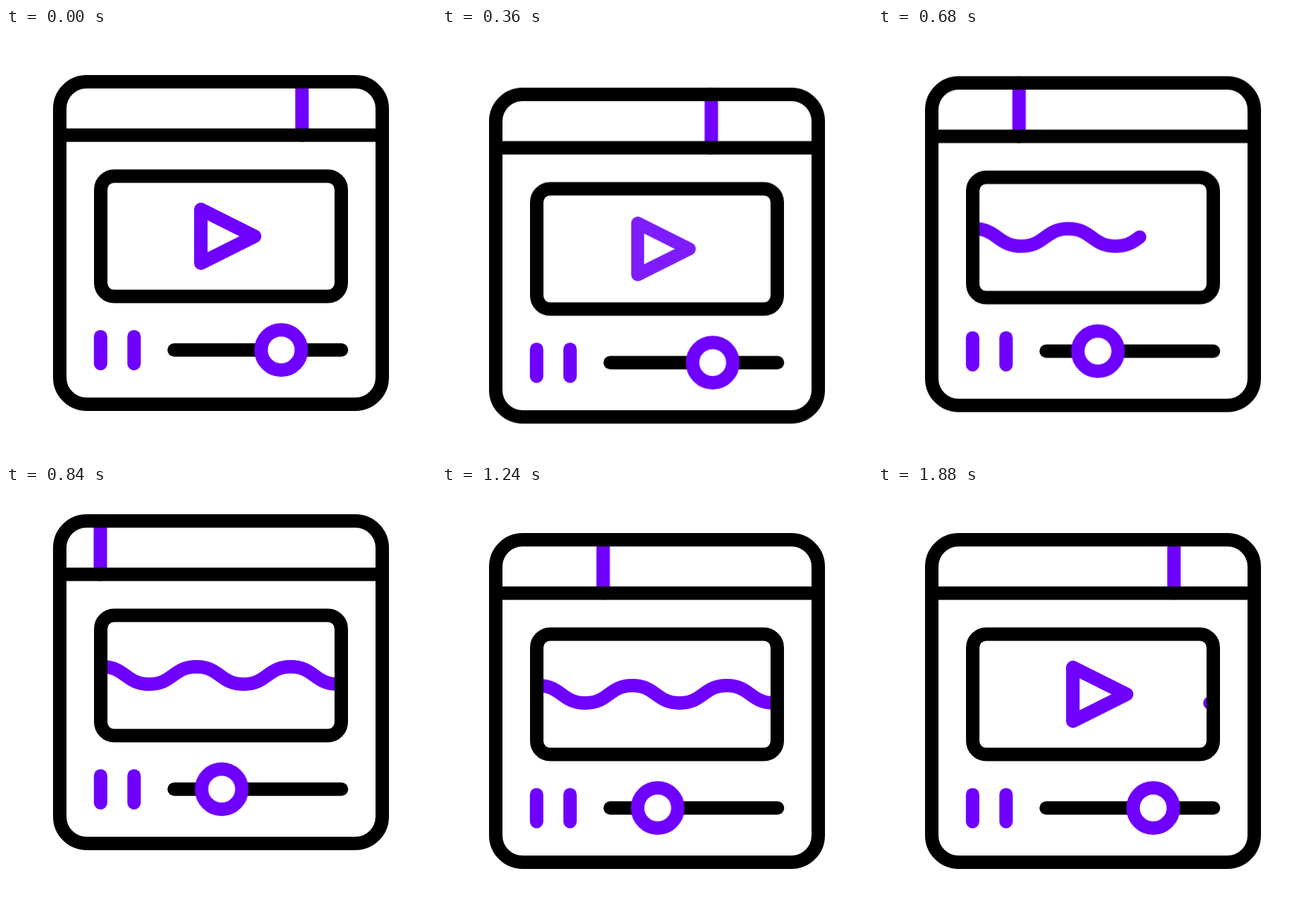
Recreate the animation shown at these times as an HTML page. Size 640x640 px, loop 2000 ms.

```html
<!DOCTYPE html>
<html lang="en">
<head>
<meta charset="utf-8">
<title>Media player icon</title>
<style>
  html, body { margin: 0; width: 100%; height: 100%; overflow: hidden; background: #fff; }
  svg { display: block; width: 100%; height: 100%; }
  g, path, rect, circle {
    fill: none;
    stroke-width: 20;
    stroke-linecap: round;
    stroke-linejoin: round;
  }
  .ink { stroke: #000; }
  .accent { stroke: #6f00ff; }

  .body, .tab, .knob, .wave, .play, .pause {
    animation: 2s cubic-bezier(.3333, 0, .6667, 1) infinite;
  }
  .body { animation-name: bob; }
  .tab { animation-name: slide; }
  .knob { animation-name: seek; fill: #fff; }
  .wave { animation-name: draw; stroke-dasharray: 1 2; }
  .play { animation-name: shrink, fade; transform-origin: 320px 310px; }
  .pause { animation-name: squeeze; }

  @keyframes bob {
    0%, 8% { transform: translateY(0); }
    26% { transform: translateY(32px); }
    42% { transform: translateY(-28px); }
    62%, 100% { transform: translateY(0); }
  }
  @keyframes slide {
    0%, 10% { transform: translateX(0); }
    46% { transform: translateX(-310.5px); }
    86%, 100% { transform: translateX(0); }
  }
  @keyframes seek {
    0%, 14% { transform: translateX(0); }
    38%, 62% { transform: translateX(-88.6px); }
    80%, 100% { transform: translateX(0); }
  }
  /* the line grows from the left, then leaves to the right */
  @keyframes draw {
    0%, 20% { stroke-dashoffset: 1; }
    42%, 62% { stroke-dashoffset: 0; }
    94%, 100% { stroke-dashoffset: -1; }
  }
  @keyframes shrink {
    0%, 4% { transform: scale(1); }
    24%, 84% { transform: scale(.95); }
    94%, 100% { transform: scale(1); }
  }
  @keyframes fade {
    0%, 16% { opacity: 1; }
    26%, 84% { opacity: 0; }
    94%, 100% { opacity: 1; }
  }
  /* bars shorten towards their middle */
  @keyframes squeeze {
    0%, 62% { stroke-dasharray: 40 80; stroke-dashoffset: 0; }
    71% { stroke-dasharray: 16 80; stroke-dashoffset: -12; }
    80%, 100% { stroke-dasharray: 40 80; stroke-dashoffset: 0; }
  }
</style>
</head>
<body>
<svg viewBox="0 0 640 640">
  <g class="body">
    <path class="accent tab" d="M440.5 80V159.5"/>
    <path class="accent wave" pathLength="1"
      d="M143 297c35 0 35 26 70.2 26s35-26 70.2-26 35 26 70.2 26 35-26 70.2-26 35 26 70.2 26"/>
    <path class="accent play" d="M290 270V350L370 310Z"/>
    <g class="ink">
      <rect x="80" y="80" width="480" height="480" rx="40"/>
      <path d="M80 159.5H560"/>
      <rect x="141" y="220.4" width="358" height="179.2" rx="20"/>
      <path d="M250.3 479.2H499.3"/>
    </g>
    <path class="accent pause" pathLength="40" d="M140.8 459.4V499.4"/>
    <path class="accent pause" pathLength="40" d="M190.6 459.4V499.4"/>
    <circle class="accent knob" cx="409.6" cy="479.2" r="30"/>
  </g>
</svg>
</body>
</html>
```
